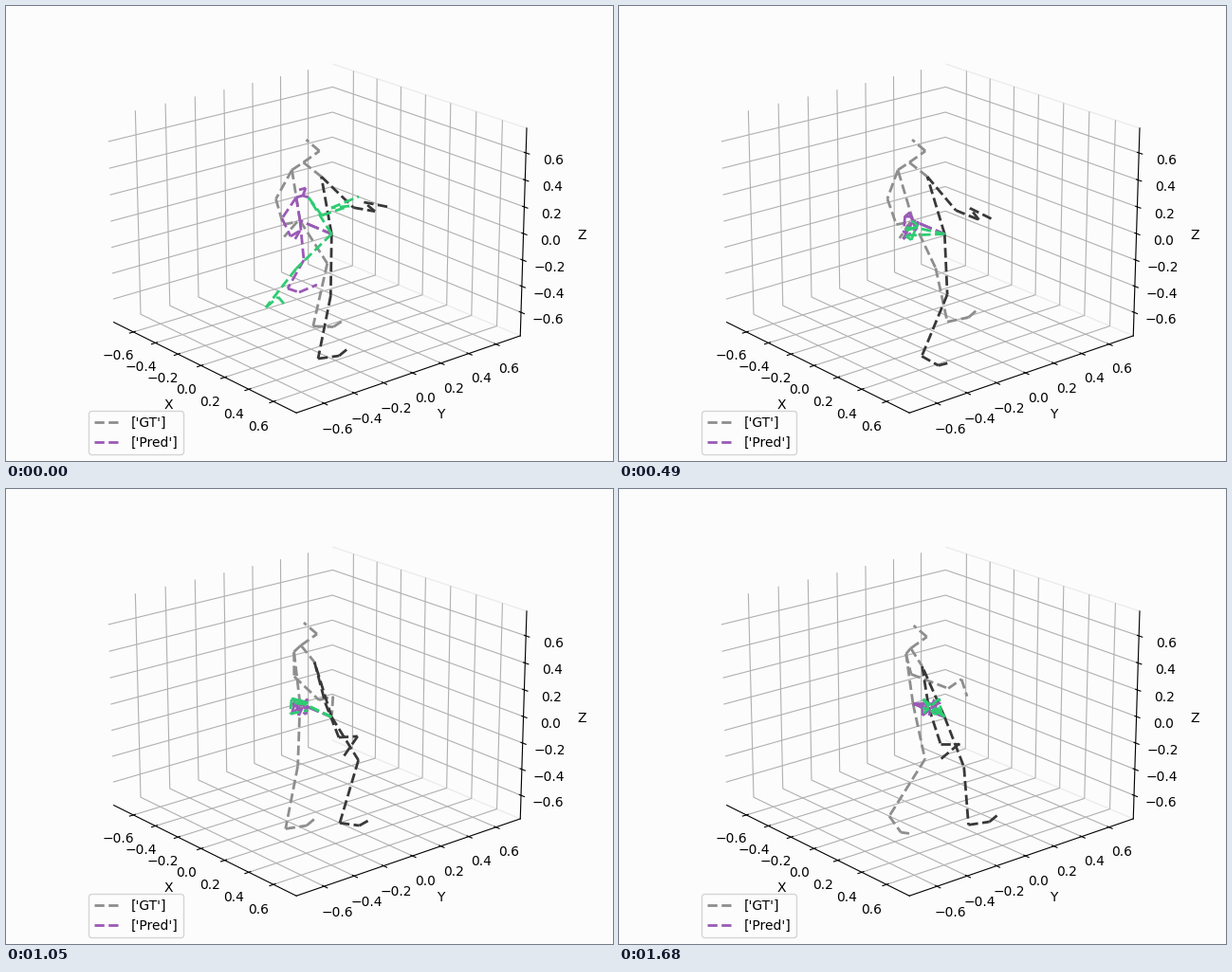
A matplotlib script for the animation above (1.75 s loop, 640 by 480 pixels).

```python
import numpy as np
import matplotlib.pyplot as plt
from matplotlib.animation import FuncAnimation
from matplotlib.collections import LineCollection
from matplotlib.lines import Line2D

W, H = 640, 480
FRAMES, STEP_MS = 25, 70
BACK = "#fcfcfc"
GRAY, BLACK, PURPLE, GREEN = "#8e8e8e", "#383838", "#9b59b6", "#2ecc71"

# Fixed joints, in screen pixels
ROOT, HIP_L, HIP_R = np.array([(326.5, 233.5), (310, 226.5), (343.3, 240.5)])

# Walking: bone angles in degrees at six even steps of one stride
STRIDE = 30
THIGH = [-1, -3, 15, 30, 29, 18]
SHIN = [-14, -18, -45, -21, 17, -1]
FOOT = [78, 69, 32, 66, 85, 77]
LEG_LENGTHS = [65, 63, 26, 11]
FORWARD, DOWN = np.array([0.87, -0.33]), np.array([0, 1])

# Arm bones: (length, angle) at the start and end, then when the turn happens
ARM_L = [((35, 119), (22, 76), 0, 24), ((28, 74), (42, 21), 4, 24),
         ((15, -11), (17, -35), 12, 24), ((21, 131), (19, 72), 2, 24)]
ARM_R = [((47, 44), (44, 81), 3, 19), ((23, 10), (40, 72), 3, 17),
         ((15, -140), (20, 0), 5, 16), ((25, 11), (25, 140), 4, 18)]

# Predicted figure before it collapses: leg, leg, arm, arm, head
PRED_START = [
    [(314, 268), (297, 298), (309, 302), (328, 294)],
    [(306, 277), (274, 318), (287, 307), (293, 314)],
    [(306, 202), (291, 224), (300, 243), (310, 237), (303, 249)],
    [(319, 202), (333, 221), (362, 211), (343, 213), (372, 201)],
    [(313, 200), (316, 192), (309, 194)],
]


def ease(t, start, end):
    s = np.clip((t - start) / (end - start), 0, 1)
    return s * s * (3 - 2 * s)


def mix(a, b, s):
    return np.asarray(a) * (1 - s) + np.asarray(b) * s


def cycle(samples, t):
    """Smooth periodic curve through six even samples."""
    c = np.fft.rfft(samples) / len(samples)
    turns = np.exp(2j * np.pi * t / STRIDE * np.arange(len(c)))
    return (c * turns * [1, 2, 2, 1]).real.sum()


def joints(start, vectors):
    return start + np.cumsum(vectors, axis=0)


def leg(hip, t):
    foot = cycle(FOOT, t)
    angles = np.radians([cycle(THIGH, t), cycle(SHIN, t), foot, foot + 33])
    return joints(hip, [n * (np.sin(a) * FORWARD + np.cos(a) * DOWN)
                        for n, a in zip(LEG_LENGTHS, angles)])


def arm(shoulder, turns, t):
    vectors = [(0, 0)]
    for first, last, begin, end in turns:
        length, angle = mix(first, last, ease(t, begin, end))
        a = np.radians(angle)
        vectors.append((length * np.cos(a), length * np.sin(a)))
    return joints(shoulder, vectors)


def walker(t):
    sway = 4.5 * np.cos(2 * np.pi * t / 16) * np.exp(-t / 20)
    neck = np.array([309 + sway, 165 + 3 * ease(t, 19, 24)])
    s = ease(t, 7, 20)
    shoulder_l = neck + mix((-12, 8), (-5, 6), s)
    shoulder_r = neck + mix((19, 15), (12, 19), s)
    head = joints(neck, [(0, 0), (17, -12), (-14, -12)])
    return (leg(HIP_L, t + 15.5), leg(HIP_R, t),
            arm(shoulder_l, ARM_L, t), arm(shoulder_r, ARM_R, t), head)


def prediction(t):
    """Shrinks from the start pose to a small cluster of wandering joints."""
    rng = np.random.default_rng(8)
    collapse = ease(t, 0, 9)
    center = np.array([308 + 22 * ease(t, 14, 24), 230])
    limbs = []
    for start in PRED_START:
        phase = rng.uniform(0, 2 * np.pi, (len(start), 2))
        period = rng.uniform(11, 20, (len(start), 2))
        wander = np.sin(2 * np.pi * t / period + phase) * (10, 9)
        limbs.append(mix(start, center + wander, collapse))
    return limbs


def bones(*points):
    return list(zip(points[:-1], points[1:]))


class Skeleton:
    def __init__(self, ax, pose, left_color, right_color):
        self.pose = pose
        self.left, self.right = (
            ax.add_collection(
                LineCollection([], colors=c, linewidths=2, linestyles="--"),
                autolim=False)
            for c in (left_color, right_color))

    def update(self, t):
        leg_l, leg_r, arm_l, arm_r, head = self.pose(t)
        self.left.set_segments(
            bones(HIP_R, ROOT, HIP_L, *leg_l) + bones(HIP_L, *arm_l)
            + bones(arm_l[0], head[0], arm_r[0]) + bones(*head))
        self.right.set_segments(bones(HIP_R, *leg_r) + bones(HIP_R, *arm_r))


fig = plt.figure(figsize=(W / 100, H / 100), dpi=100, facecolor=BACK)

# 3D box with grid
box = fig.add_axes([0, 0, 1, 1], projection="3d", facecolor=BACK)
box.view_init(elev=20, azim=-40)
LIMIT = 0.75 * 25 / 24
box.set(xlim=(-LIMIT, LIMIT), ylim=(-LIMIT, LIMIT), zlim=(-LIMIT, LIMIT),
        xlabel="X", ylabel="Y", zlabel="Z")
for axis in (box.xaxis, box.yaxis, box.zaxis):
    axis.set_ticks(np.linspace(-0.6, 0.6, 7).round(1))
    axis.set_pane_color((1, 1, 1, 0))
box.yaxis.pane.set(alpha=None, facecolor=BACK, edgecolor="#ececec")
box.legend(handles=[Line2D([], [], color=c, lw=2, ls="--", label=name)
                    for c, name in ((GRAY, "['GT']"), (PURPLE, "['Pred']"))],
           loc="lower left", facecolor=BACK)

# Flat layer in pixel units for the figures
stage = fig.add_axes([0, 0, 1, 1])
stage.set(xlim=(0, W), ylim=(H, 0))
stage.axis("off")
skeletons = [Skeleton(stage, walker, GRAY, BLACK),
             Skeleton(stage, prediction, PURPLE, GREEN)]


def update(frame):
    for skeleton in skeletons:
        skeleton.update(frame)
    return []


anim = FuncAnimation(fig, update, frames=FRAMES, interval=STEP_MS,
                     repeat=True, repeat_delay=0, blit=False)
plt.show()
```
